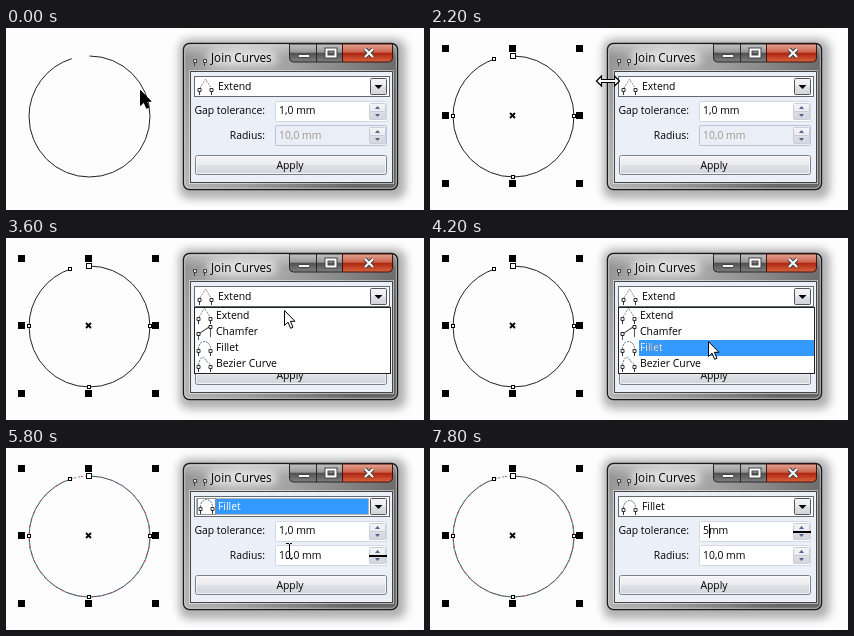
An HTML page that plays this animation: 418 px wide and 182 px high, repeating every 8 s.

```html
<!DOCTYPE html>
<html lang="en">
<head>
<meta charset="utf-8">
<title>Join Curves</title>
<style>
html, body { margin: 0; width: 100%; height: 100%; overflow: hidden; background: #fdfdfd; }
svg { display: block; width: 418px; height: 182px; }
text { font: 10.4px "Open Sans", "Noto Sans", sans-serif; fill: #000; white-space: pre; }
.title { font-size: 11.7px; }
.end { text-anchor: end; }
.mid { text-anchor: middle; }
.lit text, text.lit { fill: #fff; }
.off { fill: #a0978c; }
.blue { fill: #39f; }
.crisp { shape-rendering: crispEdges; }

/* 2.5% is one 200 ms step */
.anim { animation: 8s step-end infinite; }
#pointer { animation-name: move; }
#click { animation-name: click; }
#pick { animation-name: pick; }
#black { animation-name: black; }
#size { animation-name: size; }
#arrow { animation-name: arrow; }
#beam { animation-name: beam; }
#selection { animation-name: selected; }
#list { animation-name: list; }
#lit1 { animation-name: lit1; }
#lit2 { animation-name: lit2; }
#lit3 { animation-name: lit3; }
.before { animation-name: before; }
.after { animation-name: after; }
#comboLit { animation-name: comboLit; }
#comboPlain { animation-name: comboPlain; }
#gapText { animation-name: gapText; }
#gapLit { animation-name: gapLit; }
#gapTyped { animation-name: gapTyped; }
#caret { animation-name: caret; }
#focus { animation-name: focus; }

@keyframes move {
  0% { transform: translate(134px, 62px); }
  2.5% { transform: translate(134px, 60px); }
  5% { transform: translate(133px, 58px); }
  7.5% { transform: translate(133px, 56px); }
  27.5% { transform: translate(178px, 53px); }
  30% { transform: translate(211px, 56px); }
  32.5% { transform: translate(245px, 58px); }
  35% { transform: translate(278px, 60px); }
  45% { transform: translate(278px, 72px); }
  47.5% { transform: translate(278px, 80px); }
  50% { transform: translate(278px, 92px); }
  52.5% { transform: translate(278px, 103px); }
  72.5% { transform: translate(284px, 104px); }
  75% { transform: translate(288px, 95px); }
  77.5%, 80% { transform: translate(292px, 84px); }
  82.5% { transform: translate(270px, 82px); }
  85% { transform: translate(250px, 80px); }
}
@keyframes click {
  0% { transform: translate(114px, 29px); visibility: hidden; }
  12.5% { transform: translate(114px, 29px); visibility: visible; }
  22.5% { visibility: hidden; transform: none; }
  37.5% { transform: translate(252px, 33px); visibility: visible; }
  42.5% { visibility: hidden; transform: none; }
  60% { transform: translate(252px, 76px); visibility: visible; }
  67.5% { visibility: hidden; transform: none; }
  80% { transform: translate(266px, 57px); visibility: visible; }
  82.5% { transform: translate(244px, 55px); visibility: visible; }
  85% { transform: translate(224px, 53px); visibility: visible; }
  87.5%, 100% { visibility: hidden; transform: none; }
}
@keyframes pick {
  0% { transform: none; visibility: hidden; }
  47.5% { transform: none; visibility: visible; }
  50% { transform: translateY(16px); visibility: visible; }
  52.5% { transform: translateY(32px); visibility: visible; }
  62.5%, 100% { transform: none; visibility: hidden; }
}
@keyframes black { 0% { visibility: visible; } 27.5%, 100% { visibility: hidden; } }
@keyframes size { 0% { visibility: hidden; } 27.5% { visibility: visible; } 30%, 100% { visibility: hidden; } }
@keyframes arrow {
  0% { visibility: hidden; } 30% { visibility: visible; } 62.5% { visibility: hidden; }
  82.5% { visibility: visible; } 90%, 100% { visibility: hidden; }
}
@keyframes beam { 0% { visibility: hidden; } 62.5% { visibility: visible; } 82.5%, 100% { visibility: hidden; } }
@keyframes selected { 0% { visibility: hidden; } 15%, 100% { visibility: visible; } }
@keyframes list { 0% { visibility: hidden; } 42.5% { visibility: visible; } 62.5%, 100% { visibility: hidden; } }
@keyframes lit1 { 0% { visibility: hidden; } 47.5% { visibility: visible; } 50%, 100% { visibility: hidden; } }
@keyframes lit2 { 0% { visibility: hidden; } 50% { visibility: visible; } 52.5%, 100% { visibility: hidden; } }
@keyframes lit3 { 0% { visibility: hidden; } 52.5% { visibility: visible; } 62.5%, 100% { visibility: hidden; } }
@keyframes before { 0% { visibility: visible; } 62.5%, 100% { visibility: hidden; } }
@keyframes after { 0% { visibility: hidden; } 62.5%, 100% { visibility: visible; } }
@keyframes comboLit { 0% { visibility: hidden; } 62.5% { visibility: visible; } 80%, 100% { visibility: hidden; } }
@keyframes comboPlain { 0% { visibility: hidden; } 80%, 100% { visibility: visible; } }
@keyframes gapText { 0% { visibility: visible; } 82.5%, 100% { visibility: hidden; } }
@keyframes gapLit { 0% { visibility: hidden; } 82.5% { visibility: visible; } 90%, 100% { visibility: hidden; } }
@keyframes gapTyped { 0% { visibility: hidden; } 90%, 100% { visibility: visible; } }
@keyframes caret { 0% { visibility: hidden; } 90% { visibility: visible; } 95% { visibility: hidden; } 97.5%, 100% { visibility: visible; } }
@keyframes focus {
  0% { visibility: hidden; transform: translateY(24px); }
  62.5% { visibility: visible; transform: translateY(24px); }
  80%, 100% { visibility: visible; transform: none; }
}
</style>
</head>
<body>
<svg viewBox="0 0 418 182">
  <defs>
    <linearGradient id="glass" x2="1" y2=".3">
      <stop stop-color="#8f8f8f"/><stop offset=".25" stop-color="#b4b4b4"/>
      <stop offset=".5" stop-color="#a2a2a2"/><stop offset="1" stop-color="#666"/>
    </linearGradient>
    <linearGradient id="gloss" x2="0" y2="1">
      <stop stop-color="#fff" stop-opacity=".35"/><stop offset="1" stop-color="#fff" stop-opacity="0"/>
    </linearGradient>
    <linearGradient id="dark" x2="0" y2="1">
      <stop stop-color="#c4c4c4"/><stop offset=".46" stop-color="#989898"/>
      <stop offset=".5" stop-color="#505050"/><stop offset="1" stop-color="#808080"/>
    </linearGradient>
    <linearGradient id="red" x2="0" y2="1">
      <stop stop-color="#e6a393"/><stop offset=".46" stop-color="#cc6550"/>
      <stop offset=".5" stop-color="#ad2410"/><stop offset="1" stop-color="#d8643e"/>
    </linearGradient>
    <linearGradient id="face" x2="0" y2="1">
      <stop stop-color="#f5f5f7"/><stop offset=".48" stop-color="#ececf0"/>
      <stop offset=".52" stop-color="#dedfe5"/><stop offset="1" stop-color="#d3d5dc"/>
    </linearGradient>
    <filter id="soft" x="-10%" y="-10%" width="120%" height="120%"><feGaussianBlur stdDeviation="4"/></filter>
    <filter id="glow" x="-20%" y="-60%" width="140%" height="220%"><feGaussianBlur stdDeviation="4"/></filter>

    <circle id="arc" r="60.5" fill="none" transform="translate(83.5 88.5) rotate(-90)"/>
    <g id="feet" fill="#fff" stroke="#333">
      <path d="M2.5 14V17M14.5 14V17"/>
      <path d="M1 10.5h3v3h-3zM13 10.5h3v3h-3z"/>
    </g>
    <g id="extend"><path d="M3 10L8.5 1L14 10" fill="none" stroke="#888" stroke-dasharray="2 1"/><use href="#feet"/></g>
    <g id="chamfer">
      <path d="M2.5 11L14.5 3" fill="none" stroke="#222"/><path d="M2.5 11v6M14.5 3v11" stroke="#555"/>
      <path d="M1 9.5h3v3h-3zM13 2.5h3v3h-3z" fill="#fff" stroke="#222"/>
    </g>
    <g id="fillet"><path d="M2.5 10C2.5 0 14.5 0 14.5 10" fill="none" stroke="#567f86" stroke-dasharray="2 1"/><use href="#feet"/></g>
    <g id="bezier"><path d="M2.5 10C4 1 8 1 9 4S13 7 14.5 10" fill="none" stroke="#567f86" stroke-dasharray="2 1"/><use href="#feet"/></g>
    <g id="spin">
      <rect x="363.5" y="75.5" width="16" height="16" rx="1" fill="url(#face)" stroke="#c8cedb"/>
      <path d="M364 83.5h15" stroke="#c8cedb"/>
      <path d="M369 81h5l-2.5-3zM369 86h5l-2.5 3z" fill="#4e638f"/>
    </g>
    <path id="tip" d="M.5.5V15.5L4 12.2L6.6 18.3L9 17.2L6.4 11.3H11z"/>
    <g id="signs" fill="none">
      <path d="M293 28h10"/><path d="M320.5 21.5h9v7h-9z"/><path d="M359 21l8 8M367 21l-8 8"/>
    </g>
  </defs>

  <rect width="418" height="182" fill="#fdfdfd"/>

  <!-- curve, open between 342 and 360 degrees -->
  <use href="#arc" class="anim before" stroke="#222" stroke-dasharray="361.5 99"/>
  <g class="anim after">
    <use href="#arc" stroke="#444a58" stroke-dasharray="361.5 99"/>
    <g stroke-dasharray="2 5" clip-path="polygon(0 0, 65px 0, 65px 33px, 83px 33px, 83px 0, 418px 0, 418px 182px, 0 182px)">
      <use href="#arc" stroke="#d0405c"/>
      <use href="#arc" stroke="#3fae9b" stroke-dashoffset="3"/>
    </g>
  </g>
  <g id="selection" class="anim crisp">
    <path d="M12 17h7v7h-7zM79 17h7v7h-7zM146 17h7v7h-7zM12 84h7v7h-7zM146 84h7v7h-7zM12 152h7v7h-7zM79 152h7v7h-7zM146 152h7v7h-7z"/>
    <path d="M80.5 25.5h5v5h-5zM62.500 29.500h3v3h-3zM142.500 86.500h3v3h-3zM81.500 147.500h3v3h-3zM21.500 86.500h3v3h-3z" fill="#fff" stroke="#000"/>
    <path d="M80 85l5 5M85 85l-5 5" stroke="#000" stroke-width="1.8" shape-rendering="auto"/>
  </g>

  <!-- window -->
  <rect x="173" y="11" width="227" height="160" rx="10" fill="#555" opacity=".45" filter="url(#soft)"/>
  <rect x="177.5" y="15.5" width="214" height="146" rx="6" fill="url(#glass)" stroke="#1a1a1a" stroke-width="1.4"/>
  <rect x="178.7" y="16.7" width="211.6" height="143.6" rx="5" fill="none" stroke="#fff" stroke-opacity=".55"/>
  <path d="M179 21q0-4 4-4h203q4 0 4 4v8H179z" fill="url(#gloss)"/>
  <rect x="201" y="23" width="70" height="14" rx="7" fill="#fff" opacity=".65" filter="url(#glow)"/>
  <g fill="#ddd" stroke="#444">
    <path d="M188.5 31C189 23 198 23 198.5 31" fill="none" stroke="#aaa" stroke-dasharray="2 1"/>
    <path d="M187.5 31.5h3v3h-3zM197.5 31.5h3v3h-3z"/>
    <path d="M188.5 35v3M198.5 35v3"/>
  </g>
  <text class="title" x="205" y="34">Join Curves</text>

  <path d="M283.5 16v14q0 4 4 4h23.5v-18z" fill="url(#dark)" stroke="#292929"/>
  <path d="M310.5 16h26v18h-26z" fill="url(#dark)" stroke="#292929"/>
  <path d="M336.5 16h50v14q0 4-4 4h-46z" fill="url(#red)" stroke="#42120d"/>
  <use href="#signs" stroke="#444" stroke-width="4"/>
  <use href="#signs" stroke="#fff" stroke-width="2"/>

  <rect x="183.5" y="42.5" width="204" height="113" fill="none" stroke="#fff" stroke-opacity=".5"/>
  <rect x="184.5" y="43.5" width="202" height="111" fill="#ebeff7" stroke="#444"/>

  <!-- combo box -->
  <rect x="188.5" y="48.5" width="195" height="20" fill="#fff" stroke="#636770"/>
  <g class="anim before"><use href="#extend" x="191" y="50"/><text x="212" y="62">Extend</text></g>
  <g id="comboLit" class="anim lit">
    <rect class="blue" x="190.5" y="50.5" width="172" height="16" stroke="#cc9a66" stroke-dasharray="1 1"/>
    <rect x="191.5" y="50.5" width="18" height="16" fill="#fff" stroke="#555" stroke-dasharray="1 1"/>
    <use href="#fillet" x="192" y="49"/><text x="212" y="62">Fillet</text>
  </g>
  <g id="comboPlain" class="anim"><use href="#fillet" x="191" y="50"/><text x="212" y="62">Fillet</text></g>
  <rect x="364.5" y="50.5" width="16" height="16" rx="1" fill="url(#face)" stroke="#555"/>
  <path d="M368.5 57h8l-4 4z"/>

  <!-- fields -->
  <text class="end" x="259" y="86">Gap tolerance:</text>
  <text class="end" x="259" y="111">Radius:</text>
  <rect x="269.5" y="73.5" width="111" height="20" rx="1" fill="#fff" stroke="#d2d9e5"/>
  <rect class="anim before" x="269.5" y="97.5" width="111" height="20" rx="1" fill="#e9eef7" stroke="#b9c3d6"/>
  <rect class="anim after" x="269.5" y="97.5" width="111" height="20" rx="1" fill="#fff" stroke="#d2d9e5"/>
  <use href="#spin"/>
  <use href="#spin" y="24"/>
  <path id="focus" class="anim crisp" d="M363 83.5h18" stroke="#000" stroke-width="2"/>
  <text id="gapText" class="anim" x="273" y="86">1,0 mm</text>
  <g id="gapLit" class="anim">
    <rect class="blue" x="272" y="75" width="19" height="16"/>
    <text class="lit" x="273" y="86">1,0</text><text x="291" y="86">mm</text>
  </g>
  <text id="gapTyped" class="anim" x="273" y="86">5mm</text>
  <path id="caret" class="anim crisp" d="M279.5 76v14" stroke="#000"/>
  <text class="anim before off" x="273" y="111">10,0 mm</text>
  <text class="anim after" x="273" y="111">10,0 mm</text>

  <rect x="189.5" y="127.5" width="191" height="19" rx="2" fill="url(#face)" stroke="#7c7f88"/>
  <rect x="190.5" y="128.5" width="189" height="17" rx="1" fill="none" stroke="#fff" stroke-opacity=".7"/>
  <text class="mid" x="284" y="141">Apply</text>

  <!-- drop-down list -->
  <g id="list" class="anim">
    <rect x="188.5" y="69.5" width="196" height="66" fill="#fff" stroke="#222"/>
    <rect id="pick" class="anim blue" x="209" y="70" width="175" height="16"/>
    <use href="#extend" x="190" y="69"/><text x="210" y="81">Extend</text>
    <use href="#chamfer" x="190" y="85"/><text x="210" y="97">Chamfer</text>
    <use href="#fillet" x="190" y="101"/><text x="210" y="113">Fillet</text>
    <use href="#bezier" x="190" y="117"/><text x="210" y="129">Bezier Curve</text>
    <g class="lit">
      <text id="lit1" class="anim" x="210" y="81">Extend</text>
      <text id="lit2" class="anim" x="210" y="97">Chamfer</text>
      <text id="lit3" class="anim" x="210" y="113">Fillet</text>
    </g>
  </g>

  <!-- pointer -->
  <g id="click" class="anim">
    <rect x=".5" y=".5" width="14" height="15" rx="1" fill="#fff" stroke="#111"/>
    <rect x="4" y="3" width="7.5" height="10" rx="3.2" fill="#fff" stroke="#111"/>
    <path d="M4 8V6.500q0-3.500 3.500-3.500v5z"/>
    <path d="M7.500 8h4" stroke="#111"/>
  </g>
  <g id="pointer" class="anim">
    <use id="black" class="anim" href="#tip" fill="#000" stroke="#000"/>
    <use id="arrow" class="anim" href="#tip" fill="#fff" stroke="#000"/>
    <path id="size" class="anim" d="M-11.5 0l5-5v3.500h13V-5l5 5-5 5V1.500h-13V5z" fill="#fff" stroke="#000" stroke-width="1.2"/>
    <path id="beam" class="anim crisp" d="M-4-8.500h2.500M-.5-8.500h2.500M-.5-8V6M-4 6.500h2.500M-.5 6.500h2.500" stroke="#000" fill="none"/>
  </g>
</svg>
</body>
</html>
```
